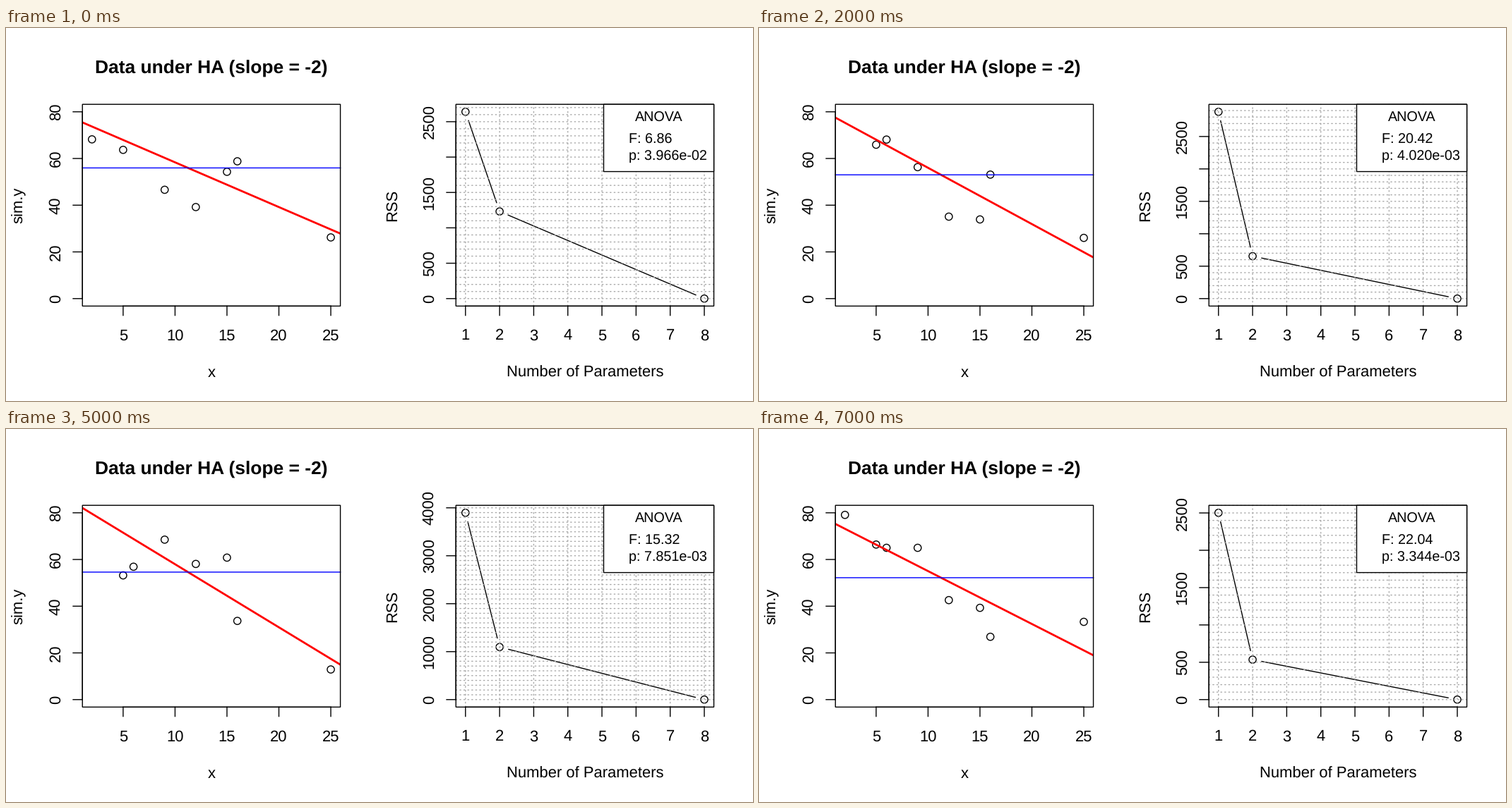
A matplotlib script for the animation above (8000 ms loop, 1058x529 px).

```python
import math

import matplotlib.pyplot as plt
import numpy as np
from matplotlib.animation import FuncAnimation
from matplotlib.patches import Circle, Rectangle

W, H, DPI = 1058, 529, 64
PT = 72 / DPI                      # points per pixel
LINE = 26.4                        # height of one margin line
FONT = 22
LW = 1.4
TOP, BOTTOM = 4.1 * LINE, H - 5.1 * LINE
LEFT_BOX = (4.1 * LINE, H - 2.1 * LINE)
RIGHT_BOX = (H + LEFT_BOX[0], H + LEFT_BOX[1])
TICK = LINE / 2
GAP = LINE / 2                     # space kept free around joined points
GRID = "#a9a9a9"

X = np.array([2, 5, 6, 9, 12, 15, 16, 25])
SXX = ((X - X.mean()) ** 2).sum()

# Each run: total RSS, F, p, simulated y for every x
RUNS = [
    (2640, 6.86, "3.966e-02", [68.2, 63.7, 90.7, 46.6, 39.2, 54.3, 58.8, 26.2]),
    (5643, 8.38, "2.754e-02", [76.7, 70.3, 81.8, 31.3, 66.1, 31.9, 69.4, 2.0]),
    (2881, 20.42, "4.020e-03", [85.6, 65.9, 68.1, 56.3, 35.1, 33.9, 53.1, 26.0]),
    (2440, 40.00, "7.303e-04", [73.2, 75.2, 70.8, 49.8, 48.7, 52.7, 48.3, 17.2]),
    (2280, 15.02, "8.211e-03", [72.6, 69.3, 59.9, 52.2, 60.8, 67.6, 40.4, 18.6]),
    (3896, 15.32, "7.851e-03", [92.7, 53.2, 56.9, 68.5, 58.1, 60.8, 33.7, 12.9]),
    (2720, 21.50, "3.552e-03", [78.8, 58.7, 73.4, 68.3, 45.2, 32.2, 49.8, 17.6]),
    (2502, 22.04, "3.344e-03", [79.1, 66.4, 65.0, 65.0, 42.6, 39.3, 26.9, 33.3]),
]

plt.rcParams.update({
    "font.family": "Liberation Sans",
    "text.hinting": "none",
    "path.snap": False,
    "toolbar": "None",
})
fig = plt.figure(figsize=(W / DPI, H / DPI), dpi=DPI, facecolor="white")
ax = fig.add_axes([0, 0, 1, 1])


def scale(lo, hi, start, end):
    """Map data lo..hi to start..end with a 4 % margin on both sides."""
    margin = 0.04 * (hi - lo)
    unit = (end - start) / (hi - lo + 2 * margin)
    return lambda v: start + (v - lo + margin) * unit


def line(xs, ys, color="black", width=LW, z=2, **style):
    return ax.plot(xs, ys, color=color, lw=width * PT, zorder=z, **style)[0]


def text(x, y, label, size=FONT, ha="center", **style):
    ax.text(x, y, label, fontsize=size * PT, ha=ha, va="baseline",
            rotation_mode="anchor", zorder=8, **style)


def box(x0, y0, x1, y1, fill="none", z=5):
    ax.add_patch(Rectangle((x0, y0), x1 - x0, y1 - y0, facecolor=fill,
                           edgecolor="black", lw=LW * PT, zorder=z))


def point(x, y):
    ax.add_patch(Circle((x, y), 5.1, facecolor="none", edgecolor="black",
                        lw=LW * PT, zorder=3))


def x_axis(sx, ticks, title, center):
    line([sx(ticks[0]), sx(ticks[-1])], [BOTTOM, BOTTOM], z=5)
    for t in ticks:
        line([sx(t)] * 2, [BOTTOM, BOTTOM + TICK], z=5)
        text(sx(t), BOTTOM + 1.82 * LINE, str(t))
    text(center, BOTTOM + 3.82 * LINE, title)


def y_axis(sy, ticks, title, edge):
    line([edge, edge], [sy(ticks[0]), sy(ticks[-1])], z=5)
    free = H
    for t in ticks:
        y = sy(t)
        line([edge - TICK, edge], [y, y], z=5)
        half = 0.278 * FONT * len(str(t))
        # Labels too close to the previous one are skipped
        if y + half < free:
            text(edge - 1.2 * LINE, y, str(t), rotation=90)
            free = y - half - 0.83 * FONT
    text(edge - 3.2 * LINE, (TOP + BOTTOM) / 2, title, rotation=90)


def joined(points):
    """Points linked by segments that stop short of the markers."""
    for (x0, y0), (x1, y1) in zip(points, points[1:]):
        f = GAP / math.hypot(x1 - x0, y1 - y0)
        dx, dy = f * (x1 - x0), f * (y1 - y0)
        line([x0 + dx, x1 - dx], [y0 + dy, y1 - dy])
    for p in points:
        point(*p)


def draw_data(rss, f_value, ys):
    x0, x1 = LEFT_BOX
    sx = scale(2, 25, x0, x1)
    sy = scale(0, 80, BOTTOM, TOP)
    mean = np.mean(ys)
    slope = -math.sqrt(rss * f_value / (f_value + 6) / SXX)

    for x, y in zip(X, ys):
        if y < 83.2:
            point(sx(x), sy(y))
    ends = np.array([1.08, 25.92])
    fit = line(sx(ends), sy(mean + slope * (ends - X.mean())), "red", 2 * LW,
               z=4, solid_capstyle="butt")
    fit.set_clip_path(Rectangle((x0, TOP), x1 - x0, BOTTOM - TOP,
                                transform=ax.transData))
    line([x0, x1], [sy(mean)] * 2, "blue", z=4)

    box(x0, TOP, x1, BOTTOM)
    center = (x0 + x1) / 2
    x_axis(sx, range(5, 26, 5), "x", center)
    y_axis(sy, range(0, 81, 20), "sim.y", x0)
    text(center, 64.3, "Data under HA (slope = -2)", 1.2 * FONT, weight="bold")


def draw_rss(rss, f_value, p_value):
    x0, x1 = RIGHT_BOX
    sx = scale(1, 8, x0, x1)
    sy = scale(0, rss, BOTTOM, TOP)
    limit = int(1.04 * rss)

    joined([(sx(1), sy(rss)), (sx(2), sy(rss / (1 + f_value / 6))),
            (sx(8), sy(0))])
    dots = dict(color=GRID, z=4, linestyle=(0, (1, 3)), dash_capstyle="round")
    for v in range(0, min(limit, 5000) + 1, 100):
        line([x0, x1], [sy(v)] * 2, **dots)
    for n in range(1, 9):
        line([sx(n)] * 2, [BOTTOM, TOP], **dots)

    box(x0, TOP, x1, BOTTOM)
    x_axis(sx, range(1, 9), "Number of Parameters", (x0 + x1) / 2)
    y_axis(sy, range(0, limit + 1, 500 if rss < 3600 else 1000), "RSS", x0)

    box(846.5, TOP, x1, 203.6, "white", z=6)
    small = 0.9 * FONT
    text(924.5, 132.5, "ANOVA", small)
    text(882, 163.6, f"F: {f_value:.2f}", small, "left")
    text(882, 187.6, f"p: {p_value}", small, "left")


def draw(i):
    rss, f_value, p_value, ys = RUNS[i]
    ax.clear()
    ax.set(xlim=(0, W), ylim=(H, 0))
    ax.axis("off")
    draw_data(rss, f_value, ys)
    draw_rss(rss, f_value, p_value)


anim = FuncAnimation(fig, draw, frames=len(RUNS), init_func=lambda: draw(0),
                     interval=1000, repeat=True, repeat_delay=0)
plt.show()
```
